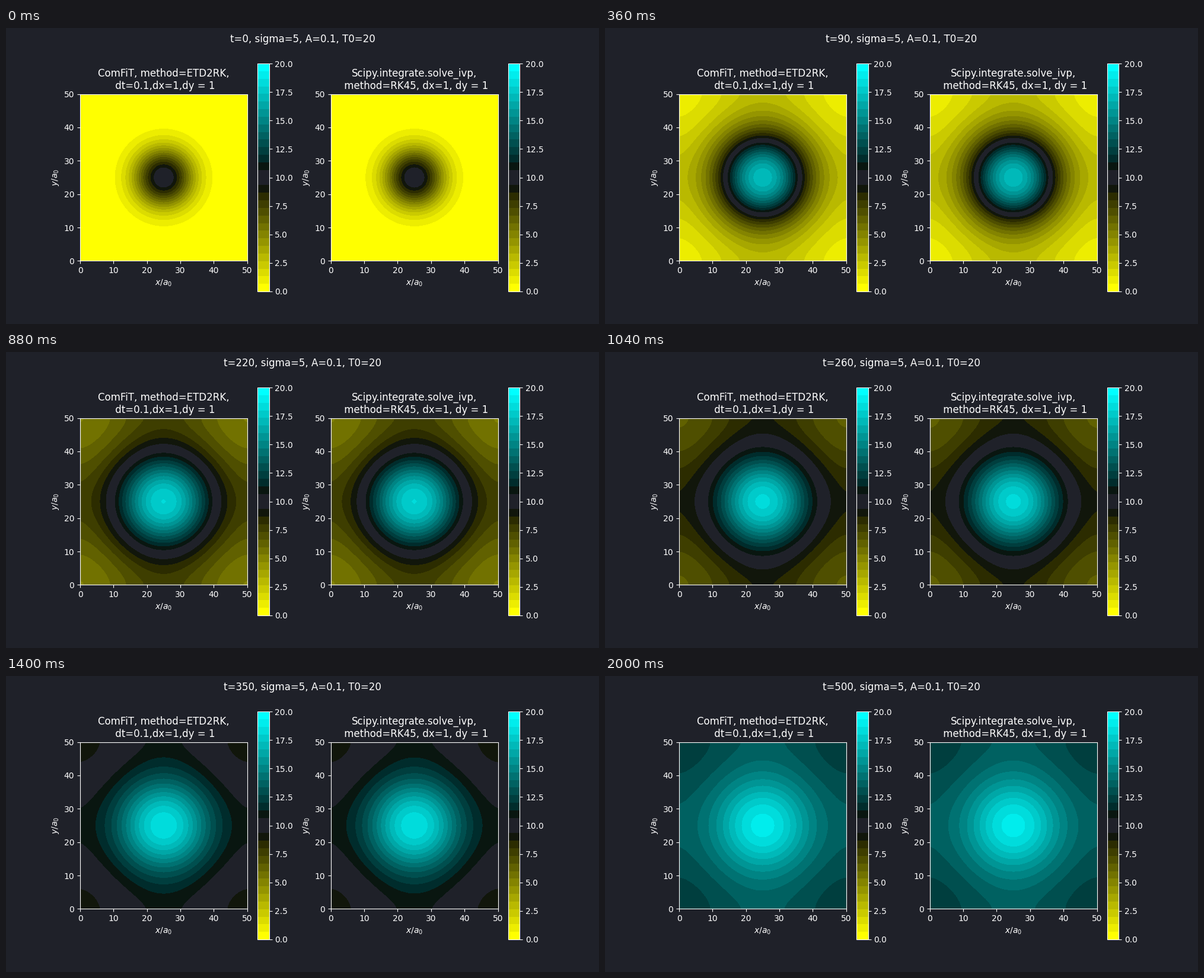
A matplotlib script for the animation above (2040 ms loop, 1000 by 500 pixels).

```python
import numpy as np
import matplotlib.pyplot as plt
from matplotlib.animation import FuncAnimation
from matplotlib.cm import ScalarMappable
from matplotlib.colors import ListedColormap, Normalize

BG = "#1f2129"
FRAMES, INTERVAL = 51, 40
SIZE, SIGMA, RATE, T0 = 51, 5, 0.1, 20
DT, STEPS = 0.1, 100
BANDS = 30

plt.rcParams.update({
    "font.family": "DejaVu Sans",
    "figure.facecolor": BG,
    "axes.facecolor": BG,
    "text.color": "white",
    "axes.edgecolor": "white",
    "axes.labelcolor": "white",
    "xtick.color": "white",
    "ytick.color": "white",
})

x = np.arange(SIZE)
X, Y = np.meshgrid(x, x)
heater = RATE * np.exp(-((X - 25) ** 2 + (Y - 25) ** 2) / (2 * SIGMA ** 2))


def solve(laplacian):
    """Heat equation with a Gaussian heater at T0, by exponential RK2."""
    z = laplacian * DT
    z[0, 0] = 1
    decay = np.exp(z)
    p1 = DT * (decay - 1) / z
    p2 = DT * (decay - 1 - z) / z ** 2
    decay[0, 0], p1[0, 0], p2[0, 0] = 1, DT, DT / 2

    def source(uf):
        return np.fft.rfft2(heater * (T0 - np.fft.irfft2(uf, s=X.shape)))

    uf = np.zeros(z.shape, complex)
    states = []
    for _ in range(FRAMES):
        for _ in range(STEPS):
            n = source(uf)
            a = decay * uf + p1 * n
            uf = a + p2 * (source(a) - n)
        states.append(np.fft.irfft2(uf, s=X.shape))
    return states


kx = 2 * np.pi * np.fft.rfftfreq(SIZE)[None, :]
ky = 2 * np.pi * np.fft.fftfreq(SIZE)[:, None]
spectral = solve(-(kx ** 2 + ky ** 2))
stencil = solve(2 * np.cos(kx) + 2 * np.cos(ky) - 4)


def band_colour(i):
    s = (i - (BANDS - 1) / 2) / ((BANDS - 1) / 2)
    return (max(-s, 0), abs(s), max(s, 0))


colours = [band_colour(i) for i in range(BANDS)]
mid = BANDS // 2
colours[mid - 1] = colours[mid] = (31 / 255, 33 / 255, 41 / 255)
colours[mid - 2] = (17 / 255, 22 / 255, 11 / 255)
colours[mid + 1] = (9 / 255, 22 / 255, 16 / 255)
cmap = ListedColormap(colours)
norm = Normalize(0, T0)
levels = np.linspace(0, T0, BANDS + 1)

fig, axes = plt.subplots(1, 2, figsize=(10, 5), dpi=100)
title = fig.suptitle("")
panels = list(zip(axes, (spectral, stencil)))
names = ("ComFiT, method=ETD2RK,\n dt=0.1,dx=1,dy = 1",
         "Scipy.integrate.solve_ivp,\n method=RK45, dx=1, dy = 1")

for ax, name in zip(axes, names):
    ax.set_aspect("equal")
    ax.set(xlim=(0, 50), ylim=(0, 50), xlabel="$x/a_0$", ylabel="$y/a_0$")
    ax.set_xticks(range(0, 51, 10))
    ax.set_yticks(range(0, 51, 10))
    ax.set_title(name)
    fig.colorbar(ScalarMappable(norm, cmap), ax=ax)

drawn = []


def update(k):
    while drawn:
        drawn.pop().remove()
    for ax, states in panels:
        field = np.clip(states[k], 0, T0)
        drawn.append(ax.contourf(X, Y, field, levels=levels, cmap=cmap, norm=norm))
    title.set_text(f"t={10 * k}, sigma=5, A=0.1, T0=20")
    return drawn + [title]


anim = FuncAnimation(fig, update, frames=FRAMES, interval=INTERVAL,
                     init_func=lambda: update(0), repeat=True, repeat_delay=0)
plt.show()
```
